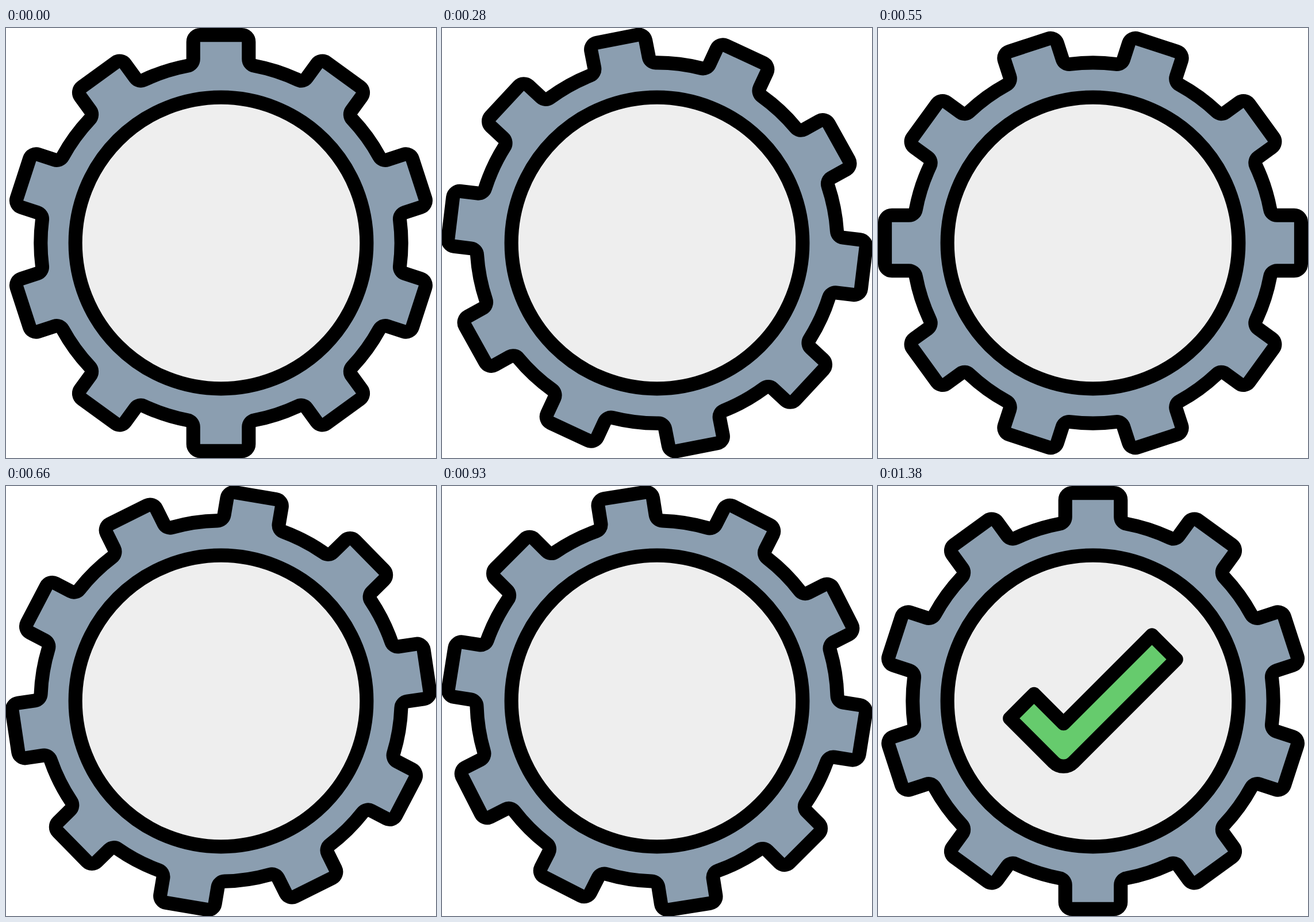
An HTML page for the animation above (2.82 s loop, 748 px wide and 748 px high).

```html
<!DOCTYPE html>
<html lang="en">
<head>
<meta charset="utf-8">
<title>Gear and check</title>
<style>
  html, body { margin: 0; width: 100%; height: 100%; overflow: hidden; background: #fff; }
  svg { display: block; width: 100vw; height: 100vh; }
  path, circle { stroke: #000; stroke-width: 16; stroke-linejoin: round; }
</style>
</head>
<body>
<svg viewBox="0 0 496 496">
  <g transform="translate(248 248)">
    <path id="gear" fill="#8b9eb0"/>
    <circle r="168" fill="#eee"/>
  </g>
  <path id="check" fill="#66cb6d" opacity="0"
    d="M316 172 L344 200 L225.3 318.7 A16 16 0 0 1 202.7 318.7 L152 268 L180 240 L214 274 Z"/>
</svg>
<script>
  const LOOP = 2820, STEP = 34.5, TEETH = 10;
  const gear = document.getElementById('gear');
  const check = document.getElementById('check');

  function gearPath() {
    const body = 208, r = 8, half = 32, top = -240;
    const filletY = -Math.sqrt((body + r) ** 2 - (half + r) ** 2);
    const k = body / (body + r);
    const footX = (half + r) * k, footY = filletY * k;
    let d = '';
    for (let i = 0; i < TEETH; i++) {
      const a = i * 2 * Math.PI / TEETH, c = Math.cos(a), s = Math.sin(a);
      const at = (x, y) => `${(x * c - y * s).toFixed(2)} ${(x * s + y * c).toFixed(2)} `;
      const arc = (rad, sweep, x, y) => `A${rad} ${rad} 0 0 ${sweep} ${at(x, y)}`;
      d += (i ? arc(body, 1, -footX, footY) : 'M' + at(-footX, footY))
        + arc(r, 0, -half, filletY)
        + 'L' + at(-half, top + r) + arc(r, 1, -half + r, top)
        + 'L' + at(half - r, top) + arc(r, 1, half, top + r)
        + 'L' + at(half, filletY) + arc(r, 0, footX, footY);
    }
    return d + `A${body} ${body} 0 0 1 ${-footX} ${footY}Z`;
  }

  // cubic-bezier(.448, 0, .55, 1)
  function ease(t) {
    if (t <= 0) return 0;
    if (t >= 1) return 1;
    let lo = 0, hi = 1;
    for (let i = 0; i < 30; i++) {
      const u = (lo + hi) / 2, v = 1 - u;
      const x = 1.344 * u * v * v + 1.65 * u * u * v + u * u * u;
      if (x < t) lo = u; else hi = u;
    }
    return lo * lo * (3 - 2 * lo);
  }

  const span = (n, from, to) => Math.min(1, Math.max(0, (n - from) / (to - from)));

  function draw(ms) {
    const n = Math.floor((ms % LOOP + 5) / STEP);
    const turn = ease(span(n, 1, 16)) + ease(span(n, 17, 32.2));
    gear.setAttribute('transform', `rotate(${-270 * turn})`);
    const p = span(n, 33, 40);
    check.setAttribute('transform', `translate(${-115 * (1 - ease(p))} 0)`);
    check.setAttribute('opacity', p);
  }

  gear.setAttribute('d', gearPath());
  let start = null;
  function tick(now) {
    if (start === null) start = now;
    draw(now - start);
    requestAnimationFrame(tick);
  }
  draw(0);
  requestAnimationFrame(tick);
</script>
</body>
</html>
```
